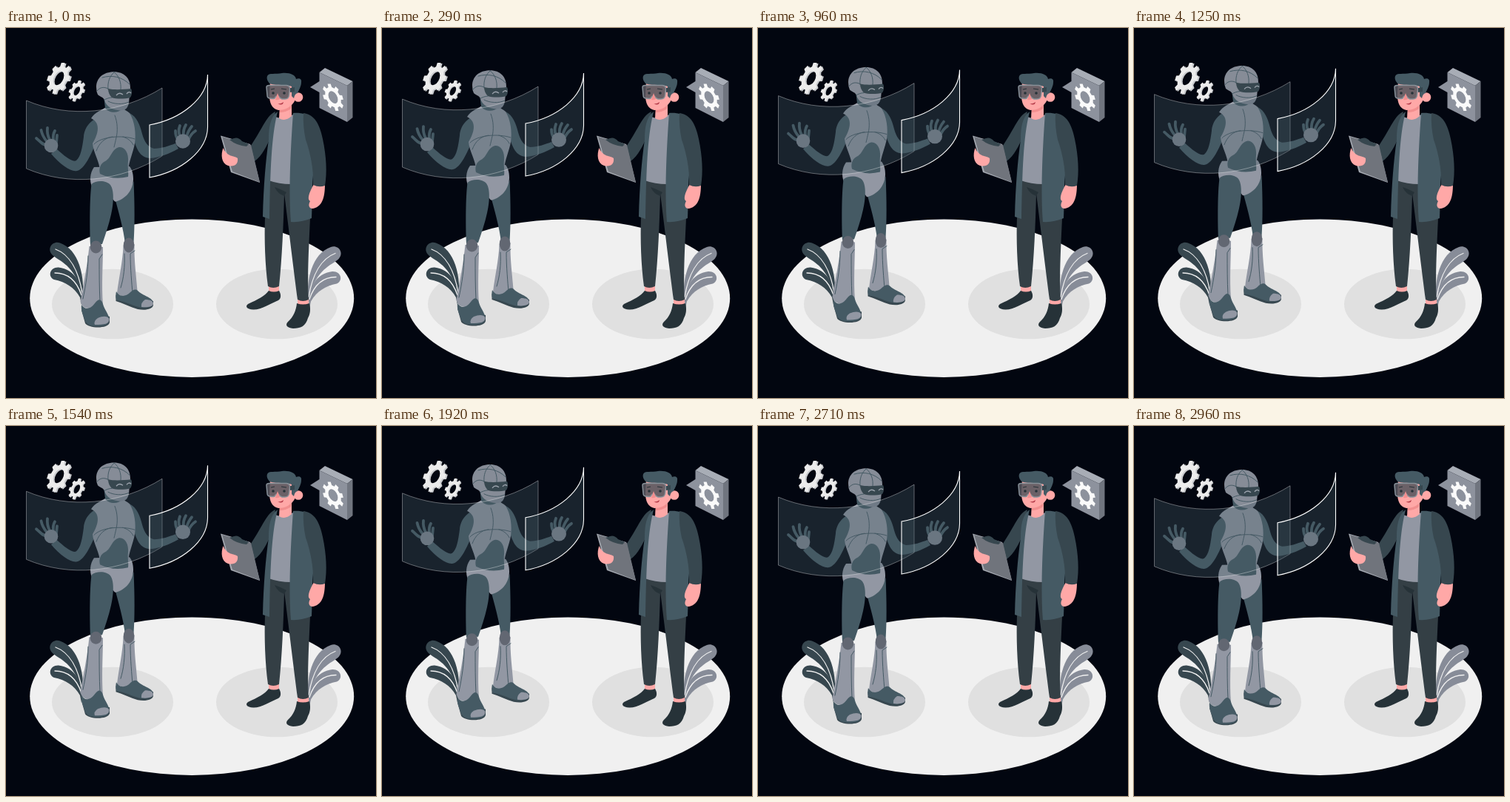
An HTML page that plays this animation: 500x500 px, repeating every 3000 ms.

```html
<!DOCTYPE html>
<html lang="en">
<head>
<meta charset="utf-8">
<title>Robot and engineer</title>
<style>
html, body { margin: 0; width: 100%; height: 100%; overflow: hidden; background: #020610; }
svg { display: block; width: 100%; height: 100%; }
.dark { fill: #455a64; }
.deep { fill: #37474f; }
.ink { fill: #263238; }
.gray { fill: #9297a3; }
.skin { fill: #ffa8a7; }
.line { fill: none; stroke: #455a64; stroke-width: 1; stroke-linecap: round; stroke-linejoin: round; }
.finger { fill: none; stroke: #455a64; stroke-width: 3.8; stroke-linecap: round; stroke-linejoin: round; }
.vein { fill: none; stroke: #f0f0f0; stroke-width: 1.3; stroke-linecap: round; }
.glass { fill: #455a64; fill-opacity: .35; }
</style>
</head>
<body>
<svg viewBox="0 0 500 500">
  <defs>
    <g id="leaves">
      <path d="M103 372C108 335 98 299 73 290.500C63 287 55 298 62 306C69 314 89 317 101 352Z"/>
      <path d="M102 374C105 346 93 326 71 323.500C59 323 56 336 65 340C80 343 92 350 100 364Z"/>
      <path class="vein" d="M67 299C86 306 98 328 103 358M66 331C85 331 96 343 102 361"/>
    </g>
  </defs>

  <ellipse cx="251.2" cy="365.2" rx="219" ry="106.7" fill="#f0f0f0"/>
  <g fill="#e0e0e0">
    <ellipse cx="144" cy="373" rx="82" ry="47.3"/>
    <ellipse cx="366" cy="373" rx="82" ry="47.3"/>
  </g>
  <use href="#leaves" class="deep"/>
  <use href="#leaves" fill="#878c98" transform="matrix(-1 0 0 1 512 5.5)"/>
  <g id="gears"></g>

  <g id="robot">
    <!-- far leg -->
    <path class="dark" d="M146 226C160 228 168 220 172.500 207C174 240 174 268 172.500 290L161 292C159 272 152 248 146 226Z"/>
    <path class="gray" d="M158.500 294C158 315 152 340 150 359Q164 368 177.500 355C176 335 173 315 173.500 292Z"/>
    <path class="line" d="M155 351C159 338 161 322 160 305M174 301L168 305C168 325 170 345 171 359"/>
    <ellipse cx="166" cy="293.500" rx="7.300" ry="10" fill="#626772"/>
    <path class="deep" d="M148.500 361V369C158 372 168 377 178 380C188 382 199 380 199 374V369Z"/>
    <path class="dark" d="M149 356C154 365 163 362 167 358C171 354 175 352 178 355C185 362 198 364 199 371C199 378 188 379 179 377C168 374 160 369 150 368C148 366 148 361 149 356Z"/>
    <path class="gray" d="M188 367C195 367 199 369 199 373C198 377 190 378 183 377Q182 371 188 367Z"/>

    <!-- near leg and hips -->
    <path class="gray" d="M119 188C113 196 113 207 116 214L145 232Q147 236 150 234C163 230 172 218 172 204C172 196 170 191 167 187Z"/>
    <path class="dark" d="M115.500 211C121 206 135 205 141 212C147 220 145 240 142 252C139 266 134 280 130 292L114 293C113 266 113 231 115.500 211Z"/>
    <path class="gray" d="M112.500 295C110 320 104 350 100.500 370Q105 386 131 374C129 347 131 320 131 296Z"/>
    <path class="line" d="M104 366C108 347 111 328 111 308M130 306L126 312C126 332 126 350 127 369"/>
    <ellipse cx="121.500" cy="296" rx="7.800" ry="8.500" fill="#626772"/>
    <path class="deep" d="M102 381L107 399C111 406 138 407 140 398V390Z"/>
    <path class="dark" d="M102 374C108 383 116 378 120 372C125 365 129 366 131 373C133 381 139 386 139.500 394C140 402 131 403 122 403C111 403 107 398 106 393C104 387 101 382 102 374Z"/>
    <path class="gray" d="M124 392C131 389 137 389 139.500 393C140 400 133 401 120 401Q118 396 124 392Z"/>

    <!-- neck, arms, trunk -->
    <path class="dark" d="M127 121C115 123 106 134 105 147C103 162 101 174 95 179C90 182 80 174 68 163L61 170C74 185 88 195 96 193C106 191 115 171 122 154Z"/>
    <path class="dark" d="M167 115C177 120 181 131 184 143C187 154 192 161 200 163C210 163 221 159 229 156L233 163C221 170 207 175 195 176C181 176 176 162 172 149Z"/>
    <path class="gray" d="M115 122C120 114 129 111 135 107H157C160 111 164 112 167 115C174 126 176 143 174 156C172 168 166 180 165 193Q146 202 127 194C127 181 118 169 117 156C123 146 130 129 115 122Z"/>
    <path class="dark" d="M132 92L134 108C138 115 152 116 157 109V100Z"/>
    <path class="dark" d="M127 197C125 189 128 183 134 180C142 176 143 163 153 161C161 160 166 170 165 180C164 188 166 196 165 201Q145 206 127 197Z"/>
    <path class="line" d="M119 157C128 147 156 144 174 150M147 118C151 128 151 140 149 148C148 153 147 157 146 161M122 166C126 155 134 148 144 147M172 158C169 152 164 149 158 147"/>

    <!-- hands -->
    <path class="finger" d="M55 158C49 158 47 154 41 149M55 153Q49 146 47.500 138M59 151Q55 143 56 135M64 152Q63 144 66 139M68 155L69 145"/>
    <circle cx="61" cy="159" r="9.300" fill="#7e8590"/>
    <path class="finger" d="M232 150Q229 146 229 139M235 146Q232 140 235 132M240 145Q239 138 243 131M244 147Q246 139 251 133M247 150Q250 143 256 139"/>
    <ellipse cx="239" cy="153" rx="10" ry="9.700" fill="#7e8590"/>

    <!-- head -->
    <path fill="#868c97" d="M122 80C122 68 131 59.300 146 59.300C160 59.300 168 68 168 81L166 101C165 108 161 111.500 155 111.500C144 111 135 106 133 97C131 93 127 93 124 90Q122 86 122 80Z"/>
    <path class="line" d="M146 59.500C153 65 156 74 155 83M130 67C143 63 157 66 167 76M138 83C137 73 140 65 146 60M123 85C127 80 132 79 138 82M133 97C135 96 139 94 143 94M138 99C145 103 158 104 166 100"/>
    <path class="deep" d="M138 82C147 84 158 83 169 82C171 86 170 91 168 94C160 96 149 96 143 94C140 91 138 87 138 82Z"/>
    <path d="M149 91Q153 86 158 90M163 89Q166 85 169 88" fill="none" stroke="#9da4ae" stroke-width="1.300"/>

    <path class="glass" stroke="#fff" stroke-opacity=".4" stroke-width=".9" d="M27.500 98C85 122.500 155 116 211 81V173C155 208 85 214.500 27.500 190Z"/>
    <path class="glass" stroke="#fff" stroke-width="1.100" d="M194 131C237 123 272 95 272.500 63V134C272 166 237 194 194 202Z"/>
  </g>

  <g id="engineer">
    <!-- legs -->
    <path class="skin" d="M355 347H369V355Q361 359 355 355ZM394 365H409V373Q401 377 394 373Z"/>
    <path fill="#343f45" d="M356 205L385 209L386 261L411 257C409 300 407 340 409 367Q401 371 394 367C389 330 381 262 376 224C375 265 373 312 369 349Q361 353 354 349C350 320 349 285 350 255Z"/>
    <path class="ink" d="M363 215Q372 218 379 222L376 227Q367 224 363 215Z"/>
    <path class="ink" d="M355 355Q362 358 369 355C372 360 372 366 368 368C356 373 345 381 334 380.500C325 380 323 376 327 373C340 367 350 362 355 355ZM393 372Q401 375 410 372C412 380 411 387 408 392C405 403 398 406 388 406C379 405 377 401 381 397C388 391 392 382 393 372Z"/>

    <!-- coat -->
    <path class="deep" d="M364 113C353 117 347 135 331 159L326 168L336 180C346 173 353 158 358 147Z"/>
    <path class="gray" d="M362 119Q377 127 390 115L385 211Q369 211 355 206Z"/>
    <path class="dark" d="M367 113L365 122C358 155 357 205 356 258L347 255C348 214 351 178 355 151C355 135 357 120 367 113Z"/>
    <path class="dark" d="M388 115C396 114 409 116 414 122L416 190C413 212 414 240 413 257Q399 263 385 262C382 225 384 170 388 115Z"/>
    <path class="skin" d="M416 211H431C431 225 429 239 418 243C411 246 407 241 411 234C406 231 411 220 416 211Z"/>
    <path class="deep" d="M402 115C417 117 424 130 428 150C433 174 434 195 431 213Q423 216 415 212C416 190 411 168 405 151Q401 133 402 115Z"/>

    <!-- clipboard -->
    <path fill="#a5a9b1" d="M290 145.500L330 157L343 209L304 195Z"/>
    <path fill="#70747c" d="M292 147L331 158L343 208.500L306 194Z"/>
    <path class="deep" d="M302 151L308 149Q314 147 319 153L328 157L325 160Q312 159 302 151Z"/>
    <path class="skin" d="M293.500 162C290 171 291 183 300 186C309 188 314 184 313 176C308 172 299 175 293.500 162Z"/>

    <!-- head -->
    <path class="skin" d="M370 104L386 102L386 119Q377 127 369 122Z"/>
    <path fill="#f28f8f" d="M370 110Q380 110 386 103L385 109Q379 114 370 114Z"/>
    <path class="skin" d="M357 73H391V97C386 107 377 111 368 111C359 109 356 101 356 91Z"/>
    <circle class="skin" cx="395" cy="93.500" r="6.300"/>
    <path class="dark" d="M353 65C355 60 364 63 373 61C383 60 391 63 392 69C396 67 400 69 399 73C399 79 396 83 394 88Q390 89 389 95L386 92L386 79C378 76 367 78 357 75.500C353 72 352 68 353 65Z"/>
    <path fill="#b53d4b" d="M367 102Q371 103 375 100Q374 106 367 102Z"/>
    <path d="M352 80Q352 77.500 356 77.500H379Q383.500 78 383.500 82L382.500 91Q382 96 377 96H373Q370 95 368 92Q365 91 363 95Q361 96 357 95Q353 95 353 91Z" fill="#56565e" fill-opacity=".88" stroke="#879098" stroke-width="1.500"/>
    <path fill="#f28f8f" d="M367 88L364 97Q367 98 370 96Z"/>
    <path d="M384 81L390 80V86L384 87Z" fill="#37474f"/>
    <path d="M358 83L363 82M372 82L379 83" stroke="#263238" stroke-width="1.200"/>
    <circle class="ink" cx="361" cy="88" r="1.800"/>
    <circle class="ink" cx="376" cy="88" r="1.800"/>
  </g>

  <g id="bubble">
    <path fill="#a8adb6" d="M423.500 60L431 54L468.500 72L461 78Z"/>
    <path fill="#70757f" d="M461 78L468.500 72V121L461 127Z"/>
    <path fill="#8d929d" d="M423.500 60L461 78V127L423.500 108V87L411 80L423.500 72Z"/>
  </g>
</svg>
<script>
const $ = id => document.getElementById(id);

// Eight-toothed wheel of unit radius with a round hole
function wheel() {
  let d = '';
  for (let i = 0; i < 8; i++) {
    for (const [turn, r] of [[-.29, .76], [-.2, 1], [.2, 1], [.29, .76]]) {
      const a = (i + turn + .5) * Math.PI / 4;
      d += (d ? 'L' : 'M') + (r * Math.cos(a)).toFixed(3) + ' ' + (r * Math.sin(a)).toFixed(3);
    }
  }
  return d + 'ZM.45 0A.45 .45 0 1 0 -.45 0A.45 .45 0 1 0 .45 0Z';
}

function gear(x, y, r, slope, fill) {
  return `<path d="${wheel()}" fill="${fill}" fill-rule="evenodd"
    transform="matrix(${.84 * r} ${slope * r} 0 ${r} ${x} ${y})"/>`;
}

$('gears').innerHTML =
  gear(73, 68.8, 19.5, -.42, '#c9cbce') + gear(71, 67.8, 19.5, -.42, '#ececec') +
  gear(96.6, 85.5, 13, -.42, '#c9cbce') + gear(95.2, 84.8, 13, -.42, '#ececec');
$('bubble').innerHTML += gear(442, 93.7, 17, .43, '#fafafa');

function draw(now) {
  const t = now % 3000 / 1500;
  $('robot').setAttribute('transform', `translate(0 ${-10 * (1 - Math.abs(1 - t))})`);
  requestAnimationFrame(draw);
}
requestAnimationFrame(draw);
</script>
</body>
</html>
```
